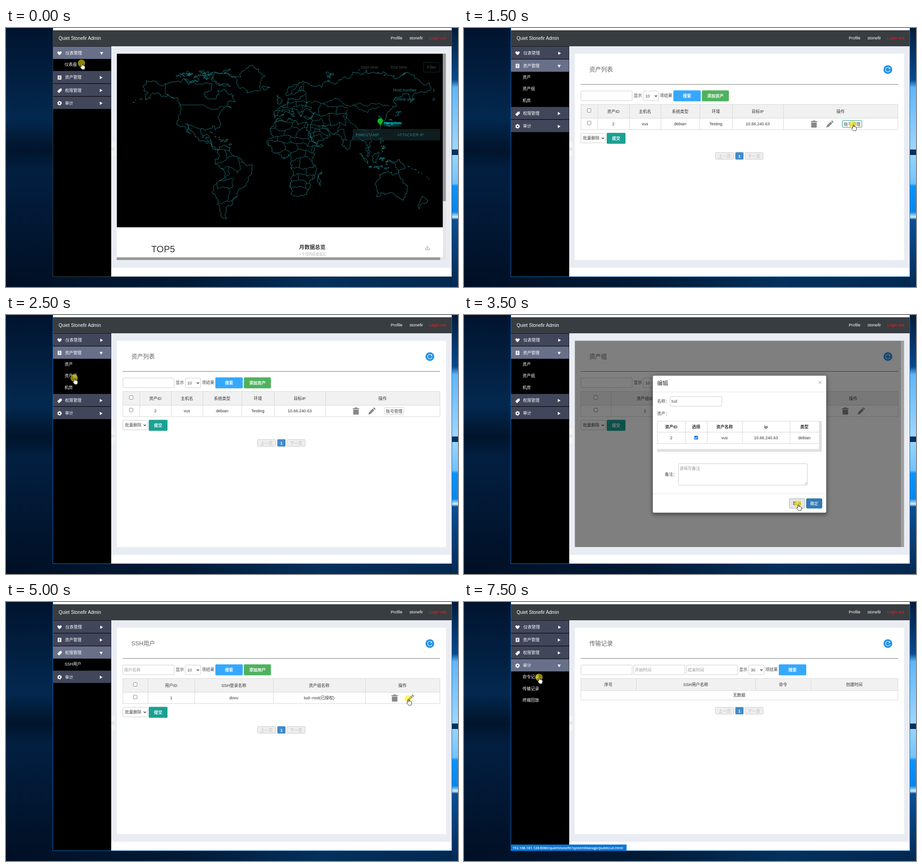
Animation of 988x567 px, one loop 8000 ms. Source, as an HTML page:

```html
<!DOCTYPE html>
<html lang="zh-CN">
<head>
<meta charset="utf-8">
<style>
html, body { margin: 0; width: 100%; height: 100%; overflow: hidden; background: #01122b }
svg { display: block }
text { font-family: "Liberation Sans", "Noto Sans CJK SC", "Noto Sans CJK", sans-serif; white-space: pre }
</style>
</head>
<body>
<svg id="stage" width="988" height="567" viewBox="0 0 988 567"></svg>
<script>
const rect = (x, y, w, h, fill, more = '') =>
  `<rect x="${x}" y="${y}" width="${w}" height="${h}" fill="${fill}" ${more}/>`;
const box = (x, y, w, h, fill = '#fff', line = '#ccc', r = 2) =>
  rect(x + .5, y + .5, w - 1, h - 1, fill, `stroke="${line}" rx="${r}"`);
const path = (d, fill, more = '') => `<path d="${d}" fill="${fill}" ${more}/>`;
const stroke = (d, color, w = 1) => path(d, 'none', `stroke="${color}" stroke-width="${w}"`);
const text = (x, y, s, size = 9, fill = '#444', more = '') =>
  `<text x="${x}" y="${y}" font-size="${size}" fill="${fill}" ${more}>${s}</text>`;
const mid = (x, y, s, size, fill, more = '') => text(x, y, s, size, fill, 'text-anchor="middle" ' + more);
const at = (x, y, s) => `<g transform="translate(${x} ${y})">${s}</g>`;
const gradient = (id, dir, stops) => `<linearGradient id="${id}" x2="${+(dir === 'x')}" y2="${+(dir === 'y')}">` +
  stops.map(([o, c]) => `<stop offset="${o}" stop-color="${c}"/>`).join('') + '</linearGradient>';
const BOLD = 'font-weight="700"', MEDIUM = 'font-weight="500"';

// ---- world map: a few longitude/latitude points per shape, roughened by midpoint displacement
let seed = 7;
const rnd = () => (seed = seed * 16807 % 2147483647) / 2147483647 - .5;
const project = (lon, lat) => [602 + 1.8 * lon, 286 - 2.4 * lat];
const points = s => s.match(/\S+ \S+/g).map(p => project(...p.split(' ').map(Number)));

function wander([ax, ay], [bx, by], rough) {
  const dx = bx - ax, dy = by - ay;
  if (Math.hypot(dx, dy) < 3) return `L${bx.toFixed(1)} ${by.toFixed(1)}`;
  const k = rnd() * rough, m = [(ax + bx) / 2 - dy * k, (ay + by) / 2 + dx * k];
  return wander([ax, ay], m, rough) + wander(m, [bx, by], rough);
}
const line = (pts, rough = .4) => 'M' + pts[0] + pts.slice(1).map((p, i) => wander(pts[i], p, rough)).join('');
const loop = (pts, rough = .6) => line([...pts, pts[0]], rough) + 'Z';

const continents = [
  '-168 66 -156 71 -128 70 -95 68 -85 69 -94 59 -82 54 -79 55 -78 62 -65 59 -56 52 -66 50 -61 46 -76 36 -80 26 -84 30 -97 28 -96 19 -88 21 -83 10 -77 8 -105 20 -114 31 -110 23 -124 40 -124 48 -138 59 -152 60 -165 54 -162 60',
  '-77 8 -62 10 -50 0 -35 -6 -40 -20 -48 -27 -58 -37 -65 -43 -67 -55 -75 -48 -70 -18 -81 -5',
  '-6 36 10 37 20 31 33 31 43 12 51 12 39 -5 40 -15 35 -24 27 -34 18 -34 12 -17 9 4 -8 5 -17 14 -13 28',
  '-9 37 -9 43 -2 46 8 55 20 54 30 60 22 62 25 66 17 60 5 59 12 66 26 71 41 66 70 72 105 78 140 73 180 69 178 62 163 60 157 51 155 59 137 54 140 48 127 40 126 35 118 39 121 30 108 20 108 11 103 10 104 2 98 16 91 22 80 8 73 20 57 26 50 30 59 22 44 13 35 29 36 36 27 38 41 42 31 46 23 38 13 45 16 38 5 43',
  '114 -22 130 -12 136 -15 142 -11 153 -27 148 -38 138 -34 130 -32 116 -35'
];
const islands = ['-70 78 -32 83 -20 75 -42 60 -54 70', '-85 73 -62 66 -74 67', '-90 77 -62 82 -78 78', '-118 72 -102 70 -112 68',
  '-24 65 -14 65 -18 63', '-5 58 1 52 -5 50', '49 -12 47 -25 44 -20', '95 5 105 -5 100 0', '110 2 117 6 115 -4', '131 -1 150 -9 139 -8',
  '173 -35 178 -38 167 -46'];
// islet chains: from, to, count, size
const chains = [['-122 76 -82 76', 20, 9], ['-84 22 -62 14', 8, 6], ['131 33 143 44', 7, 7], ['121 18 125 7', 9, 6], ['106 -7 128 -9', 8, 6],
  ['119 1 130 -4', 8, 6], ['54 72 62 77', 4, 8], ['95 80 148 75', 6, 6], ['-180 52 -160 55', 6, 3], ['155 -7 180 -18', 7, 3]];
const chain = ([ends, n, size]) => {
  const [a, b] = points(ends);
  return Array.from({ length: n }, (_, i) => {
    const [x, y] = [0, 1].map(k => a[k] + (b[k] - a[k]) * i / (n - 1) + rnd() * size * 1.6);
    const r = size * (.8 + rnd());
    return loop([[x - r / 2, y + rnd() * r], [x + rnd() * r, y - r / 2], [x + r / 2, y + rnd() * r]]);
  }).join('');
};
// country borders: a jittered brick lattice over a region, clipped to the land
function lattice(corners, cell) {
  const [[x0, y0], [x1, y1]] = points(corners);
  const cols = Math.round((x1 - x0) / cell), rows = Math.round((y1 - y0) / cell);
  const grid = Array.from({ length: rows + 1 }, (_, j) => Array.from({ length: cols + 1 }, (_, i) =>
    [x0 + (i + rnd() * .7) * cell, y0 + (j + rnd() * .7) * cell]));
  let d = '';
  grid.forEach((row, j) => row.forEach((p, i) => {
    if (i < cols) d += line([p, row[i + 1]]);
    if (j < rows && (i + j) % 2) d += line([p, grid[j + 1][i]]);
  }));
  return d;
}
const land = continents.map(c => loop(points(c))).join('');
const frontiers = ['-95 49 -82 45 -67 46', '-141 60 -130 55', '-117 32 -97 26', '50 50 70 54 87 49 116 50 131 48', '87 49 105 42 119 47',
  '80 45 75 38 92 28 108 22', '28 47 30 58 28 70', '12 59 22 69'].map(f => line(points(f))).join('') +
  line(points('-124 49 -95 49'), 0) + line(points('-141 70 -141 60'), 0);
const regions = [['-17 35 46 -32', 17], ['-9 52 38 37', 10], ['36 48 76 14', 19], ['92 27 108 10', 12], ['-80 8 -56 -36', 22], ['-94 19 -80 8', 8]];
const world = `<clipPath id="land"><path d="${land}"/></clipPath>` +
  `<g clip-path="url(#land)">${stroke(frontiers + regions.map(r => lattice(...r)).join(''), '#1f7b7f', .9)}</g>` +
  stroke(land + islands.map(s => loop(points(s))).join('') + chains.map(chain).join(''), '#24878c', .9);

// ---- desktop and window frame
const defs = '<defs>' +
  gradient('left', 'y', [[0, '#01142f'], [.35, '#03284f'], [.47, '#01142b'], [.55, '#021f41'], [1, '#010f24']]) +
  gradient('floor', 'x', [[0, '#010f24'], [.4, '#011a36'], [.7, '#04305c'], [1, '#042850']]) +
  gradient('right', 'y', [[0, '#021b3b'], [.2, '#074a8e'], [.23, '#5fb6f8'], [.47, '#a0d6fb'], [.47, '#04315f'], [.49, '#04315f'], [.49, '#98d4fb'],
    [.6, '#74c2fa'], [.61, '#0a93fb'], [.71, '#0b86ea'], [.73, '#d8f0ff'], [.74, '#0a4f96'], [1, '#052a54']]) + '</defs>';
const frame = active => defs + rect(0, 0, 988, 567, 'url(#left)') + rect(0, 545, 988, 22, 'url(#floor)') + rect(975, 0, 13, 567, 'url(#right)') +
  rect(102, 0, 873, 545, active ? '#0b6cbd' : '#354350') + rect(103, 0, 871, 544, '#fff') + rect(103, 5, 871, 35, '#383d41') +
  rect(230, 40, 744, 485, '#e9edf3') +
  text(115, 25.5, 'Quiet Stonefir Admin', 10.1, '#fff') + text(841, 25, 'Profile', 9, '#fff') +
  text(882, 25, 'stonefir', 9, '#fff') + text(925, 25, 'Login out', 9, '#f21d1d') +
  rect(230, 249, 8, 32, '#f3f3f3') + rect(231.5, 263, 4, 4, 'none', 'stroke="#bbb" stroke-width=".7"');

// ---- sidebar
const icons = [
  path('M0 4.5C-8-1-4-6 0-2.5C4-6 8-1 0 4.5', '#fff'),
  path('M-4-4.5H4V4.5H-4ZM-2-2.5V-1.5H2V-2.5ZM-2-.5V.5H2V-.5ZM-2 1.5V2.5H1V1.5Z', '#fff', 'fill-rule="evenodd"'),
  path('M-5 2L1-4H5V0L-1 6ZM3-3V-2H4V-3Z', '#fff', 'fill-rule="evenodd"'),
  '<circle r="3" fill="none" stroke="#fff" stroke-width="2.4"/><circle r="4.2" fill="none" stroke="#fff" stroke-width="1.4" stroke-dasharray="2.2 2.2"/>'
];
const menu = [['仪表管理', '仪表盘'], ['资产管理', '资产', '资产组', '机房'], ['权限管理', 'SSH用户'], ['审计', '命令记录', '传输记录', '终端回放']];
function sidebar(open) {
  let y = 40.7, s = rect(103, 40, 127, 504, '#000');
  menu.forEach(([name, ...subs], i) => {
    const on = i === open, tx = i ? 129 : 130, ax = i ? 208 : 209;
    s += rect(103, y, 126.5, 27, on ? '#687089' : '#41465b') + at(117, y + 14.3, icons[i]) + text(tx, y + 17.3, name, 9, '#fff', MEDIUM) +
      path(on ? `M${ax - 3.5} ${y + 12}h7l-3.5 6z` : `M${ax - 3} ${y + 11}v7l6-3.5z`, '#fff');
    y += 28.1;
    if (on) {
      subs.forEach((t, k) => s += text(128, y + 14 + k * 25.4, t, 9, '#fff', MEDIUM));
      y += subs.length * 25.3;
    }
  });
  return s;
}

// ---- content widgets
const check = (x, y, on) => on
  ? rect(x - 4, y - 4, 8, 8, '#0b74e0', 'rx="1"') + stroke(`M${x - 2.5} ${y}l2 2 3-4`, '#fff', 1.2)
  : rect(x - 4, y - 4, 8, 8, '#fff', 'stroke="#777" stroke-width=".9" rx="1.2"');
const input = (x, hint = '') => box(x, 137.5, 113, 22) + text(x + 3, 151.5, hint, 9, '#999');
const select = (x, y, w, s) => box(x, y, w, 22) + text(x + 5, y + 14, s) + stroke(`M${x + w - 9} ${y + 10}l2.5 2.5 2.5-2.5`, '#333', 1.3);
const button = (x, y, w, s, fill) => rect(x, y + .4, w, 24, fill, 'rx="2"') + mid(x + w / 2, y + 15.5, s, 9, '#fff', BOLD);
const trash = x => path(`M${x - 7} 204h4v-1.5h6v1.5h4v2h-14zM${x - 6} 207h12v10q0 1-1 1h-10q-1 0-1-1z`, '#888');
const pencil = x => path(`M${x - 8} 218l1.5-5 8-8 3.5 3.5-8 8zM${x + 2.5} 204l2-1.7 3.5 3.5-2 2z`, '#888');

function table(cols, y, [h, r], rows, bold) {
  const x0 = cols[0], w = cols[cols.length - 1] - x0, single = rows[1].length === 1;
  let d = `M${x0 + .5} ${y}v${h + r}M${x0 + w + .5} ${y}v${h + r}`;
  for (const ly of [y, y + h, y + h + r]) d += `M${x0} ${ly + .5}h${w}`;
  for (const x of cols) d += `M${x + .5} ${y}v${single ? h : h + r}`;
  let s = rect(x0, y, w, h, bold ? '#fff' : '#f1f1f1') + stroke(d, '#d6d6d6');
  rows.forEach((row, k) => row.forEach((v, i) => {
    const cx = k && single ? x0 + w / 2 : (cols[i] + cols[i + 1]) / 2, cy = k ? y + h + r / 2 : y + h / 2;
    s += v === '□' || v === '■' ? check(cx, cy - (bold ? 0 : 1.5), v === '■') : mid(cx, cy + 3.5, v, 9, '#333', bold && !k ? BOLD : '');
  }));
  return s;
}
const pager = y => box(549, y, 41, 16, '#eee') + mid(569.5, y + 11.5, '上一页', 9, '#bbb') + rect(593, y, 18, 16, '#428bca', 'rx="2"') +
  mid(602, y + 11.5, '1', 9, '#fff', BOLD) + box(613.5, y, 41, 16, '#eee') + mid(634, y + 11.5, '下一页', 9, '#bbb');
const heading = s => rect(242.3, 56.3, 719.5, 451.7, '#fff') + text(274, 94.5, s, 12.8, '#666') + rect(255, 123, 694, 1, '#777') +
  '<circle cx="926.5" cy="91" r="9.6" fill="#2592e8"/>' + stroke('M930.5 88A5 5 0 1 0 931.3 92.5', '#fff', 1.1) + path('M931.5 86v3.500h-3.500z', '#fff');
// the row of page size and search button that follows the inputs
const search = (x, size) => text(x, 151, '显示') + select(x + 20.3, 137.5, 34.7, size) + text(x + 57.3, 151, '项结果') + button(x + 86.6, 136, 60, '搜索', '#36a8fc');

const listPage = (title, hint, add, cols, head, row) => heading(title) + input(255, hint) + search(371, '10') + button(520, 136, 59, add, '#4fb25d') +
  table(cols, 167, [30, 25], [['□', ...head, '操作'], ['□', ...row, '']]) + select(255, 230, 55, '批量删除') + button(312, 229, 41, '提交', '#1aa193') + pager(272);
const auditPage = (title, note) => heading(title) + ['', '开始时间', '结束时间'].map((hint, i) => input(255 + i * 115.5, hint)).join('') + search(601.5, '30') +
  table([255, 376, 637, 758, 948], 167, [26, 21], [['序号', 'SSH用户名称', '命令', '创建时间'], [note]]) + pager(230);

const TEAL = '#1f8588', DIM = '#3f4b4c';
const dashboard = rect(242.3, 56.3, 713, 451.7, '#fff') + rect(242.3, 56.3, 712.5, 380, '#000') + world +
  text(775, 89, 'Start time', 9, DIM) + text(841, 89, 'End time', 9, DIM) + box(912, 75, 37, 22, 'none', '#10302f', 3) + mid(930.5, 89, 'Filter', 9, DIM) +
  text(846, 139, 'Host number', 9, TEAL) + text(932.5, 139, '1', 9, TEAL) + text(848, 159, 'Online user', 9, TEAL) + text(932.5, 159, '0', 9, TEAL) +
  rect(758, 221, 191, 25, '#15272a', 'opacity=".75"') + text(764, 237, 'TIMESTAMP', 9, TEAL) + text(855, 237, 'ATTACKER IP', 9, TEAL) +
  path('M818 215C817 209 812 208 812 203.5A6 6 0 0 1 824 203.5C824 208 819 209 818 215', '#0ab81e') +
  text(826, 210, 'Hangzhou', 8, '#0ff', BOLD + ' style="filter:drop-shadow(-1px 4px 2px #0bb)"') +
  rect(955, 56, 7, 452, '#e6e6e6') + rect(955, 56, 6.5, 323, '#9a9a9a') + rect(242, 502, 720, 6, '#e6e6e6') + rect(242, 502, 707, 6, '#9a9a9a') +
  text(317.5, 491, 'TOP5', 20, '#333') + mid(669.5, 483.5, '月数据总览', 11.5, '#333', BOLD) + mid(669.5, 498, '一个月内历史总汇', 7.7, '#aaa') +
  stroke('M921 476v7m-3-3l3 3 3-3M917 482v3.5h8.5v-3.5', '#777', .8);

const pages = {
  dashboard,
  assets: listPage('资产列表', '', '添加资产', [255, 292, 361, 430, 515, 586, 698, 948], ['资产ID', '主机名', '系统类型', '环境', '目标IP'],
    ['2', 'vus', 'debian', 'Testing', '10.66.240.63']) + trash(765) + pencil(800) + box(826.5, 202, 43.5, 16) + mid(848.5, 213.5, '账号管理'),
  groups: listPage('资产组', '', '添加资产', [255, 321, 470, 612, 753, 948], ['资产组ID', '资产组名称', '备注'], ['1', 'tud', '']) + trash(833.5) + pencil(868.5),
  users: listPage('SSH用户', '用户名称', '添加用户', [255, 310, 412, 584, 785, 948], ['用户ID', 'SSH登录名称', '资产组名称'],
    ['1', 'dovu', 'tud--root(已授权)']) + trash(849.5) + pencil(884),
  commands: auditPage('命令记录', ''),
  transfers: auditPage('传输记录', '无数据')
};

// ---- dialogs
const dialog = (title, value, list, head, row) => rect(242.3, 56.3, 712.7, 451.7, '#000', 'opacity=".5"') + rect(955, 56, 7, 452, '#a0a0a0') +
  rect(412.5, 132.5, 379.5, 300.5, '#fff', 'rx="3" stroke="#666" stroke-width=".6" style="filter:drop-shadow(0 3px 5px rgba(0,0,0,.5))"') +
  text(422, 153.5, title, 12, '#333') + mid(778, 152, '×', 13, '#bbb', BOLD) + rect(413, 168, 379, 1, '#e5e5e5') + rect(413, 391, 379, 1, '#e5e5e5') +
  text(422, 191.5, '名称：') + box(450, 178, 114, 22) + text(453.5, 192, value) + text(422, 219, list + '：') +
  table([422, 484, 531, 608, 712, 776], 232, [24, 25], [head, row], true) + rect(776, 232, 6, 67, '#e0e0e0') + rect(422, 293.5, 360, 6, '#e0e0e0') +
  text(439, 351.5, '备注：') + box(468, 325, 283, 48) + text(471, 339, '请填写备注', 9, '#999') + stroke('M744.5 371l5-5M747.5 371l2-2', '#777', .8) +
  box(710.5, 401.5, 35, 22, '#e6e6e6', '#adadad') + mid(728, 415.5, '取消', 9, '#333') + box(748, 401.5, 35, 22, '#337ab7', '#2e6da4') + mid(765.5, 415.5, '确定', 9, '#fff');
const overlays = {
  account: dialog('账号管理', 'root', '账号', ['账号ID', '选择', '账号名称', 'ip', '类型'], ['1', '■', 'root', '10.66.240.63', 'debian']),
  group: dialog('编辑', 'tud', '资产', ['资产ID', '选择', '资产名称', 'ip', '类型'], ['2', '■', 'vus', '10.66.240.63', 'debian']),
  user: dialog('编辑', 'dovu', '资产组', ['资产组ID', '选择', '资产组名称', '账号', '状态'], ['1', '■', 'tud', 'root', '已授权']),
  hover: box(826.5, 202, 43.5, 16, 'none', '#1aa193')
};

const status = file => rect(103, 531, file.length * 3.7 + 200.5, 13.5, '#0b76d6') +
  text(106, 540.5, '192.168.181.128:8080/quietstonefir/systemManage/' + file, 7.6, '#fff', `font-weight="600" style="font-family:'Open Sans',sans-serif"`);
const cursor = (x, y) => `<circle cx="${x}" cy="${y}" r="8" fill="#ffee00" opacity=".56"/>` +
  at(x - 3, y, path('M2.5 8V1.8Q3.5 0 4.6 1.8V5.5Q6 0 6 5Q7.6 4.3 7.9 5.6Q9.3 5 9.6 6.4Q10.8 6.2 10.8 7.5V10L9.5 14H4.2L.3 9.3Q0 7.3 2.5 8', '#fff', 'stroke="#222" stroke-width=".9"'));

// page, open menu, cursor, overlay, link in the status bar; one step per half second
const cancel = [730, 414];
const steps = [
  ['dashboard', 0, [165, 77]], ['dashboard', 0, [160, 104]], ['dashboard', 1, [150, 108], '', 'assetList.html'], ['assets', 1, [850, 211], 'hover'],
  ['assets', 1, cancel, 'account'], ['assets', 1, [149, 138]], ['groups', 1, [867, 213]], ['groups', 1, cancel, 'group'],
  ['groups', 1, [152, 187]], ['groups', 2, [152, 139], '', 'sshUserManage.html'], ['users', 2, [879, 212]], ['users', 2, cancel, 'user'],
  ['users', 2, [178, 169]], ['users', 3, [168, 164], '', 'publicLei.html'], ['commands', 3, [160, 189], '', 'publicLei.html'], ['transfers', 3, [164, 165], '', 'publicLei.html']
];
const stage = document.getElementById('stage');
let shown = -1;
function tick(now) {
  const i = Math.floor(now % 8000 / 500);
  if (i !== shown) {
    const [page, open, hand, over, link] = steps[shown = i];
    stage.innerHTML = frame(i > 0) + pages[page] + (overlays[over] || '') + sidebar(open) + (link ? status(link) : '') + cursor(...hand);
  }
  requestAnimationFrame(tick);
}
tick(0);
</script>
</body>
</html>
```
